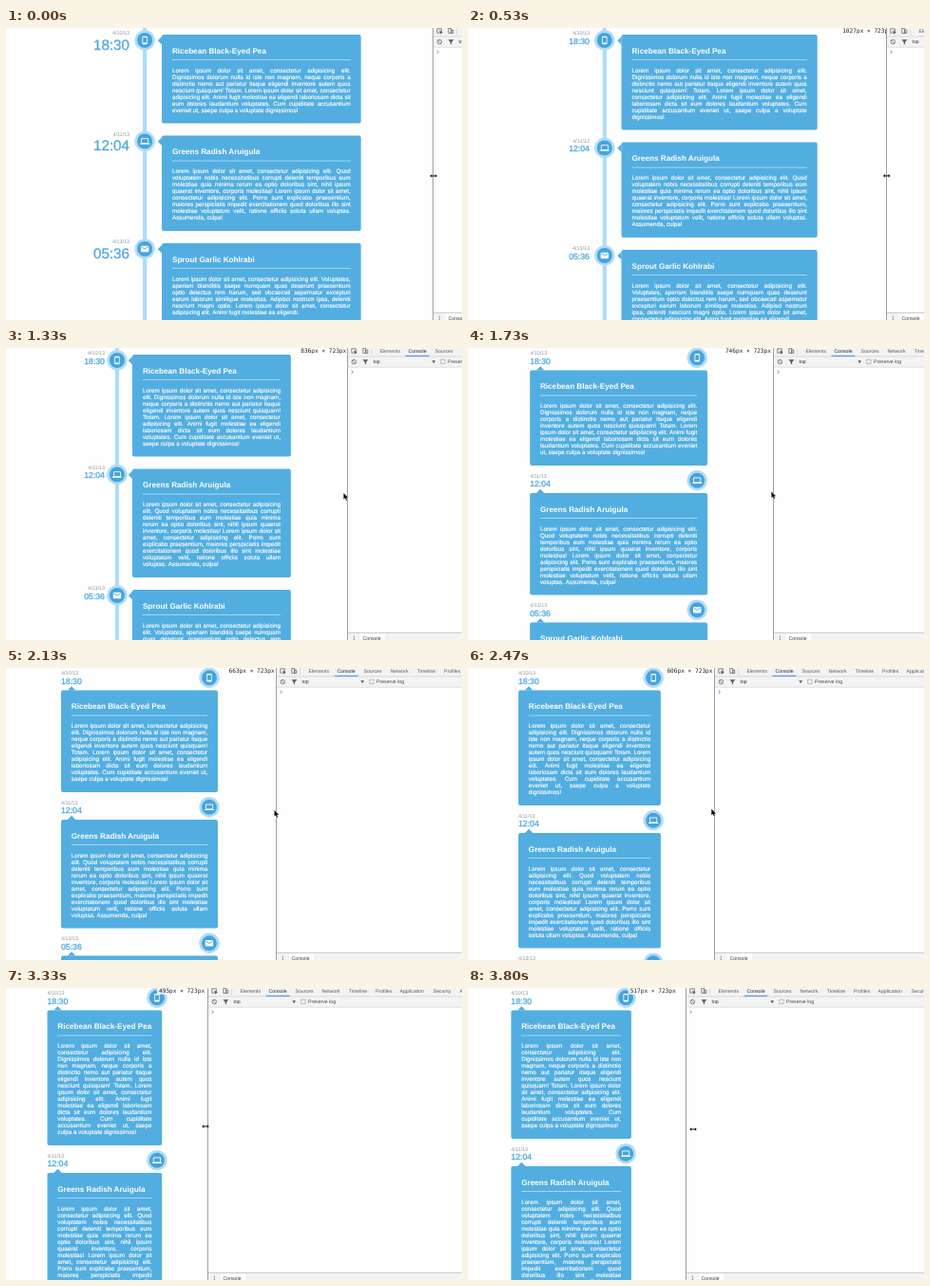
An HTML page with a canvas for the animation above (3870 ms loop, 480 px wide and 308 px high).

```html
<!DOCTYPE html>
<html lang="en">
<head>
<meta charset="utf-8">
<title>Responsive timeline</title>
<style>
  html, body { margin: 0; width: 100%; height: 100%; overflow: hidden; background: #fefefe; }
  canvas { display: block; width: 480px; height: 308px; }
</style>
</head>
<body>
<canvas id="stage"></canvas>
<script>
const canvas = document.getElementById('stage');
const ctx = canvas.getContext('2d');
const ratio = window.devicePixelRatio || 1;
canvas.width = 480 * ratio;
canvas.height = 308 * ratio;

const LOOP = 3870, START = 465, STEP = 66.5;
const SANS = '"Liberation Sans", Arial, sans-serif';
const MONO = '"DejaVu Sans Mono", monospace';
const BLUE = '#52aee1', DEEP = '#46a4da', PALE = '#afdcf8';
const LINE = 7, TITLE_LINE = 9, BODY = 6.24, TITLE = 8.15;

// time, divider x, page width, pointer x, pointer y
const KEYS = [
  [403, 449, 1044, 450, 156],
  [800, 398, 942, 394, 155.5],
  [1330, 360, 836, 355.5, 153],
  [1470, 352, 815, 349, 152.5],
  [2000, 291, 675, 289, 150.5],
  [2130, 285, 663, 282.5, 150],
  [2530, 254, 594, 251, 148.5],
  [2795, 241.5, 567, 237.5, 147],
  [3070, 218, 511, 216, 146],
  [3328, 212, 495, 210, 146],
  [3530, 203, 473, 202, 147],
  [3600, 205, 475, 207, 148],
  [3793, 229, 517, 237, 149]
];

const LOREM = 'Lorem ipsum dolor sit amet, consectetur adipisicing elit. ';
const POSTS = [
  { date: '4/10/13', time: '18:30', title: 'Ricebean Black-Eyed Pea', icon: phone,
    body: LOREM + 'Dignissimos dolorum nulla id iste non magnam, neque corporis a distinctio nemo aut ' +
      'pariatur itaque eligendi inventore autem quos nesciunt quisquam! Totam. ' + LOREM +
      'Animi fugit molestiae ea eligendi laboriosam dicta sit eum dolores laudantium voluptates. ' +
      'Cum cupiditate accusantium eveniet ut, saepe culpa a voluptate dignissimos!' },
  { date: '4/11/13', time: '12:04', title: 'Greens Radish Aruigula', icon: laptop,
    body: LOREM + 'Quod voluptatem nobis necessitatibus corrupti deleniti temporibus eum molestiae quia ' +
      'minima rerum ea optio doloribus sint, nihil ipsum quaerat inventore, corporis molestias! ' + LOREM +
      'Porro sunt explicabo praesentium, maiores perspiciatis impedit exercitationem quod doloribus ' +
      'illo sint molestiae voluptatum velit, ratione officiis soluta ullam voluptas. Assumenda, culpa!' },
  { date: '4/13/13', time: '05:36', title: 'Sprout Garlic Kohlrabi', icon: mail,
    body: LOREM + 'Voluptates, aperiam blanditiis saepe numquam quas deserunt praesentium optio delectus ' +
      'rem harum, sed obcaecati aspernatur excepturi earum laborum similique molestias. Adipisci nostrum ' +
      'ipsa, deleniti nesciunt magni optio. ' + LOREM + 'Animi fugit molestiae ea eligendi.' }
];

function sample(time) {
  if (time <= KEYS[0][0]) return KEYS[0];
  const i = KEYS.findIndex(key => key[0] >= time);
  if (i < 0) return KEYS[KEYS.length - 1];
  const a = KEYS[i - 1], b = KEYS[i];
  const p = (time - a[0]) / (b[0] - a[0]);
  return a.map((value, j) => value + (b[j] - value) * p);
}

function rect(x, y, w, h, color) {
  ctx.fillStyle = color;
  ctx.fillRect(x, y, w, h);
}

function rounded(x, y, w, h, r, color) {
  ctx.fillStyle = color;
  ctx.beginPath();
  ctx.roundRect(x, y, w, h, r);
  ctx.fill();
}

function disc(x, y, r, color) {
  ctx.fillStyle = color;
  ctx.beginPath();
  ctx.arc(x, y, r, 0, 7);
  ctx.fill();
}

function shape(points, color) {
  ctx.fillStyle = color;
  ctx.beginPath();
  points.forEach(p => ctx.lineTo(p[0], p[1]));
  ctx.fill();
}

function stroke(points, color, width) {
  ctx.strokeStyle = color;
  ctx.lineWidth = width;
  ctx.beginPath();
  points.forEach(p => ctx.lineTo(p[0], p[1]));
  ctx.stroke();
}

function setFont(size, family = SANS, weight = 'normal') {
  ctx.font = `${weight} ${size}px ${family}`;
}

// Text placed by the vertical centre of its capitals.
function text(string, x, y, size, color, align = 'left', family = SANS, weight = 'normal') {
  setFont(size, family, weight);
  ctx.textAlign = align;
  ctx.fillStyle = color;
  ctx.fillText(string, x, y + size * 0.34);
}

// A thin outline gives the heavier look of smoothed page type.
function thicken(string, x, y, color, width) {
  ctx.strokeStyle = color;
  ctx.lineWidth = width;
  ctx.lineJoin = 'round';
  ctx.strokeText(string, x, y);
}

function wrap(string, width) {
  const lines = [];
  let line = '';
  for (const word of string.trim().split(' ')) {
    const longer = line ? line + ' ' + word : word;
    if (line && ctx.measureText(longer).width > width) {
      lines.push(line);
      line = word;
    } else line = longer;
  }
  return [...lines, line];
}

function justified(line, x, y, width, last) {
  const words = line.split(' ');
  const widths = words.map(word => ctx.measureText(word).width);
  const used = widths.reduce((a, b) => a + b, 0);
  const gap = last || words.length < 2 ? BODY * 0.278 : (width - used) / (words.length - 1);
  const baseline = y + BODY * 0.34;
  words.forEach((word, i) => {
    ctx.fillText(word, x, baseline);
    thicken(word, x, baseline, '#fff', 0.16);
    x += widths[i] + gap;
  });
}

function phone(x, y) {
  rounded(x - 2.7, y - 4.2, 5.4, 8.4, 1, '#fff');
  rect(x - 1.9, y - 2.9, 3.8, 5.4, DEEP);
}

function laptop(x, y) {
  rounded(x - 4, y - 3.2, 8, 5.6, 0.7, '#fff');
  rect(x - 3.2, y - 2.4, 6.4, 4, DEEP);
  rounded(x - 5.2, y + 2.3, 10.4, 1, 0.5, '#fff');
}

function mail(x, y) {
  rounded(x - 4.2, y - 3.3, 8.4, 6.6, 0.8, '#fff');
  stroke([[x - 3.7, y - 2.3], [x, y + 0.2], [x + 3.7, y - 2.3]], DEEP, 0.9);
}

function card(post, top, left, right, wide) {
  const pad = wide ? 11 : 10.8;
  const x = left + pad, width = right - left - 2 * pad;
  setFont(TITLE, SANS, 'bold');
  const titles = wrap(post.title, width);
  setFont(BODY);
  const lines = wrap(post.body, width);
  const extra = (titles.length - 1) * TITLE_LINE;
  const height = 51.5 + extra + (lines.length - 1) * LINE;

  rounded(left, top, right - left, height, 2.1, BLUE);
  if (wide) shape([[left, top + 2], [left - 4.2, top + 6.2], [left, top + 10.4]], BLUE);
  else shape([[left + 6.8, top], [left + 11, top - 4.2], [left + 15.2, top]], BLUE);

  titles.forEach((line, i) =>
    text(line, x, top + 17 + i * TITLE_LINE, TITLE, '#fff', 'left', SANS, 'bold'));
  rect(x, top + 26.2 + extra, width, 0.8, 'rgba(255,255,255,.6)');
  setFont(BODY);
  ctx.textAlign = 'left';
  ctx.fillStyle = '#fff';
  lines.forEach((line, i) =>
    justified(line, x, top + 37.7 + extra + i * LINE, width, i === lines.length - 1));
  return height;
}

function stamp(post, x, top, wide, big) {
  const align = wide ? 'right' : 'left';
  const size = big ? 15.2 : 8.7;
  const y = top + (wide ? (big ? 10.5 : 6.6) : -9.8);
  text(post.date, x, top - (wide ? 1.6 : 17.9), 5.4, '#8f979c', align);
  text(post.time, x, y, size, '#4fa8dc', align);
  thicken(post.time, x, y + size * 0.34, '#4fa8dc', 0.3);
}

function page(width) {
  const wide = width > 755;
  const d = width - (wide ? 836 : 663);
  const left = wide ? 133 + 0.149 * d : 58 + 0.0865 * d;
  const right = wide ? 300 + 0.354 * d : 223 + 0.35 * d;
  const iconX = wide ? 117 + 0.14 * d : 214 + 0.328 * d;
  const dateX = wide ? 104 + 0.125 * d : left;
  let top = wide ? 7 : 23.5;

  if (wide) rect(iconX - 2.1, 0, 4.2, 308, PALE);
  for (const post of POSTS) {
    stamp(post, dateX, top, wide, width > 1040);
    const height = card(post, top, left, right, wide);
    const iconY = top + (wide ? 6 : -13.2);
    disc(iconX, iconY, 10.7, PALE);
    disc(iconX, iconY, 8, DEEP);
    post.icon(iconX, iconY);
    top += height + (wide ? 13 : 29);
  }
}

function sizeLabel(width) {
  const x = 161 + 0.438 * (width - 495);
  rect(x - 2, 0, 52, 6.8, 'rgba(255,255,255,.8)');
  text(`${Math.round(width)}px × 723px`, x, 2.6, 6.15, '#222', 'left', MONO);
}

function devtools() {
  const ink = '#5a5a5a';
  rect(0, 0, 480, 308, '#fefefe');
  rect(0, 0, 480, 20, '#f3f3f3');
  rect(0, 8.6, 480, 0.7, '#ccc');
  rect(0, 19.8, 480, 0.7, '#d4d4d4');

  ctx.strokeStyle = ink;
  ctx.lineWidth = 0.7;
  ctx.strokeRect(4.8, 0.8, 4.6, 4.4);
  shape([[7, 2.6], [10.6, 4.2], [8.6, 6.4]], ink);
  ctx.strokeRect(16.8, 0.4, 3, 5);
  ctx.strokeRect(19.6, 2.2, 2.2, 3.4);
  rect(25.5, 0.5, 0.6, 7, '#ccc');

  const tabs = [['Elements', 34.5], ['Console', 64.5], ['Sources', 92.5], ['Network', 120.5],
    ['Timeline', 148.8], ['Profiles', 177], ['Application', 202.5], ['Security', 237.5], ['Audits', 265.5]];
  tabs.forEach(([name, x]) => text(name, x, 2.8, 5.2, name === 'Console' ? '#222' : ink));
  rect(61.5, 7.8, 25, 1, '#3e82f7');

  ctx.strokeStyle = ink;
  ctx.beginPath();
  ctx.arc(7.3, 14.6, 2.3, 0, 7);
  ctx.stroke();
  stroke([[5.7, 13], [8.9, 16.2]], ink, 0.7);
  shape([[16.5, 12.3], [22.3, 12.3], [20.1, 14.9], [20.1, 17.4], [18.7, 16.6], [18.7, 14.9]], ink);
  text('top', 27.5, 14.5, 5.2, '#333');
  shape([[89.4, 13.2], [93, 13.2], [91.2, 16.2]], ink);
  ctx.strokeStyle = '#999';
  ctx.lineWidth = 0.6;
  ctx.strokeRect(98.7, 12.2, 4.4, 4.4);
  text('Preserve log', 106, 14.5, 5.2, '#444');
  stroke([[4.6, 23.8], [6.4, 25.4], [4.6, 27]], '#4a8df0', 0.9);

  rect(0, 300, 480, 8, '#f3f3f3');
  rect(0, 300, 480, 0.7, '#bbb');
  for (let i = 0; i < 3; i++) disc(7.3, 304 + i * 1.8, 0.55, ink);
  rect(14, 301, 26, 7, '#fff');
  text('Console', 16.5, 306.4, 5.2, '#333');
  rect(0, 0, 1, 308, '#a0a0a0');
}

function pointer(x, y, arrow) {
  if (arrow) {
    const points = [[0, 0], [0, 6.6], [1.5, 5.3], [2.6, 7.8], [3.7, 7.3], [2.7, 4.9], [4.7, 4.8], [0, 0]]
      .map(p => [x + p[0], y + p[1]]);
    stroke(points, '#fff', 1);
    shape(points, '#111');
    return;
  }
  rect(x - 2.2, y - 0.5, 4.4, 1, '#111');
  for (const side of [-1, 1])
    shape([[x + side * 3.8, y], [x + side * 1.8, y - 1.8], [x + side * 1.8, y + 1.8]], '#111');
}

function draw(time) {
  const moving = time >= START;
  const [, divider, width, px, py] =
    sample(moving ? START + 3 + Math.floor((time - START) / STEP) * STEP : 0);
  ctx.setTransform(ratio, 0, 0, ratio, 0, 0);
  ctx.textRendering = 'geometricPrecision';
  rect(0, 0, 480, 308, '#fefefe');
  page(width);
  if (moving) sizeLabel(width);
  ctx.save();
  ctx.translate(Math.floor(divider), 0);
  devtools();
  ctx.restore();
  pointer(px, py, time > 1000 && time < 3000);
}

const began = performance.now();
function tick() {
  draw((performance.now() - began) % LOOP);
  requestAnimationFrame(tick);
}
tick();
</script>
</body>
</html>
```
